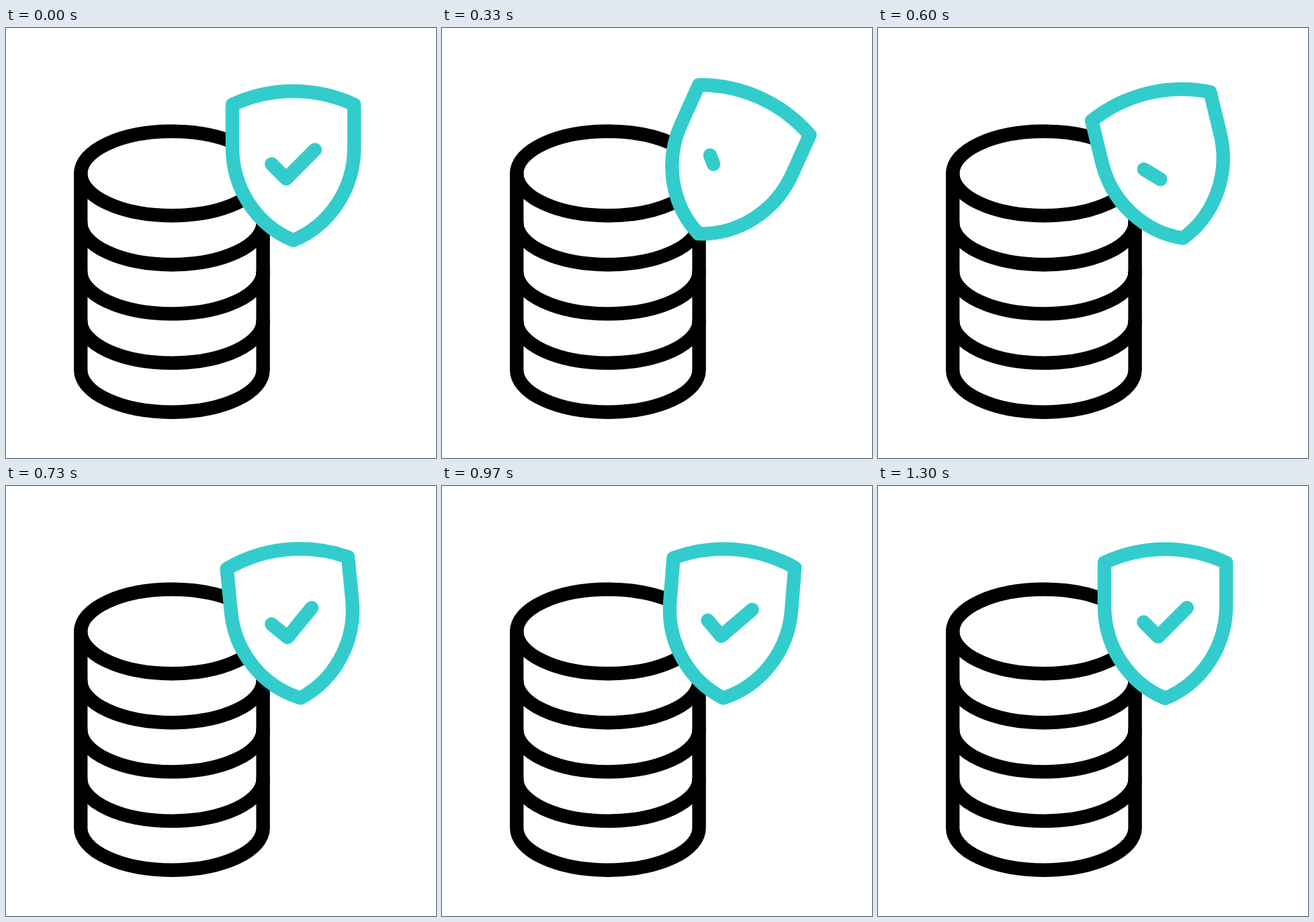
These frames come from a looping animation (640x640 px, 1.67 s). An HTML page:

```html
<!DOCTYPE html>
<html lang="en">
<head>
<meta charset="utf-8">
<title>Protected database</title>
<style>
  html, body { margin: 0; width: 100%; height: 100%; overflow: hidden; background: #fff; }
  svg { display: block; width: 100vw; height: 100vh; }
  path, ellipse { fill: none; stroke-width: 20.4; stroke-linecap: round; stroke-linejoin: round; }
  #drum { stroke: #000; }
  #shield { stroke: #33cccc; }
  #shield .plate { fill: #fff; }
</style>
</head>
<body>
<svg viewBox="0 0 640 640">
  <g id="drum">
    <ellipse cx="246.9" cy="216.5" rx="135.7" ry="62.7"/>
    <path d="M111.2 216.5V509a135.7 62.7 0 0 0 271.4 0V216.5"/>
    <path d="M111.2 216.5m0 73a135.7 62.7 0 0 0 271.4 0"/>
    <path d="M111.2 216.5m0 146.2a135.7 62.7 0 0 0 271.4 0"/>
    <path d="M111.2 216.5m0 219.4a135.7 62.7 0 0 0 271.4 0"/>
  </g>
  <g id="shield">
    <path class="plate" d="M337 114A214.8 214.8 0 0 1 518.2 114V178C518.2 240 481 294 427.6 316C374 294 337 240 337 178Z"/>
    <path id="check" pathLength="1" d="M395.3 202.5L417 224.3L459.9 181.3"/>
  </g>
</svg>
<script>
  const LOOP = 1670, STEP = 1000 / 30;
  const shield = document.getElementById('shield');
  const check = document.getElementById('check');

  // [step, value] pairs, eased in and out between neighbours
  const swing = [[0.6, 0], [12.5, 27.4], [18.9, -16], [25.8, 8.6], [34.5, -4.5], [39, 0]];
  const drawn = [[2.5, 1], [12.5, 0], [15, 0], [23, 1]];

  function valueAt(keys, k) {
    const next = keys.findIndex(key => k < key[0]);
    if (next === 0) return keys[0][1];
    if (next < 0) return keys[keys.length - 1][1];
    const [k0, a] = keys[next - 1], [k1, b] = keys[next];
    const u = (k - k0) / (k1 - k0);
    return a + (b - a) * u * u * (3 - 2 * u);
  }

  function draw(now) {
    // the motion advances in whole steps, 30 per second
    const k = Math.floor((now % LOOP + 3.4) / STEP);
    const part = valueAt(drawn, k);
    shield.setAttribute('transform', `rotate(${valueAt(swing, k)} 427.6 204.5)`);
    check.style.strokeDasharray = part < 1 ? `${part} 2` : 'none';
    check.style.visibility = part > 0 ? 'visible' : 'hidden';
    requestAnimationFrame(draw);
  }
  requestAnimationFrame(draw);
</script>
</body>
</html>
```
